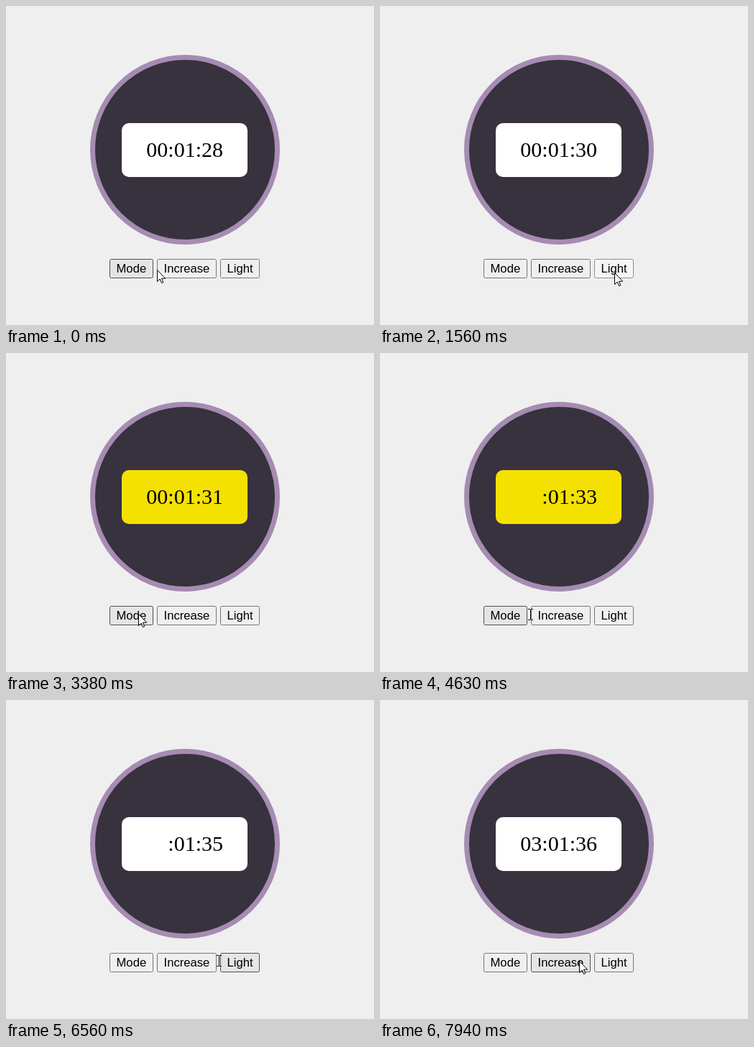
An HTML page that plays this animation: 512x444 px, repeating every 8000 ms.

```html
<!DOCTYPE html>
<html lang="en">
<head>
<meta charset="utf-8">
<title>Watch</title>
<style>
  html, body { margin: 0; width: 100%; height: 100%; overflow: hidden; background: #efefef; }
  svg { display: block; width: 512px; height: 444px; }
  .time { font: 30px "Liberation Serif", "Times New Roman", serif; }
  .button text { font: 16.667px "Liberation Sans", Arial, sans-serif; }
  .button rect { fill: #efefef; stroke: #767676; }
  .button.hover rect { fill: #e5e5e5; stroke: #4f4f4f; }
  .button.active rect { fill: #f5f5f5; stroke: #8d8d8d; }
</style>
</head>
<body>
<svg viewBox="0 0 512 444">
  <circle cx="249" cy="200" r="128.5" fill="#37323e" stroke="#a68bb2" stroke-width="7"/>
  <rect id="panel" x="161" y="163" width="175" height="75" rx="10"/>
  <text class="time" id="hours" x="195.3" y="210"></text>
  <text class="time" id="rest" x="225.3" y="210"></text>
  <g id="buttons"></g>
  <path id="arrow" d="M.5.5V16.5L4.2 13 6.6 18.6 8.8 17.6 6.4 12.2H11.6Z" fill="#fff" stroke="#000"/>
  <path id="beam" d="M-3-7.5H0M1-7.5H4M.5-7V7M-3 7.5H0M1 7.5H4" fill="none" stroke="#000"/>
</svg>
<script>
const LOOP = 8000, STEP = 62.5;
const $ = id => document.getElementById(id);
const pad = n => String(n).padStart(2, "0");

const buttons = [["Mode", 144, 61], ["Increase", 210, 83], ["Light", 298, 55]].map(([label, x, width]) => {
  $("buttons").insertAdjacentHTML("beforeend",
    `<g class="button"><rect x="${x + .5}" y="352.5" width="${width - 1}" height="26" rx="2"/>
     <text x="${x + 9.5}" y="371">${label}</text></g>`);
  return { label, x, end: x + width, node: $("buttons").lastElementChild };
});

// Pointer route: time, x, y
const route = [
  [-STEP, 205, 367], [0, 210.6, 367], [650, 318, 373], [1000, 326, 371],
  [2900, 326, 371], [3375, 184, 363], [3600, 180, 366], [4400, 180, 366],
  [4625, 209.8, 364], [5250, 357, 365], [5600, 343, 367], [6300, 343, 367],
  [6562.5, 296.6, 363], [6750, 277, 363], [LOOP, 277, 363]
];

// Button, pressed at, released at
const presses = [
  ["Light", 1530, 1680], ["Mode", 3700, 3800], ["Light", 6000, 6110],
  ["Increase", 6900, 6990], ["Increase", 7180, 7270], ["Increase", 7480, 7570]
];

function pointer(t) {
  const i = route.findIndex(k => k[0] > t);
  const [t0, x0, y0] = route[i - 1], [t1, x1, y1] = route[i];
  const p = (t - t0) / (t1 - t0);
  return { x: x0 + (x1 - x0) * p, y: y0 + (y1 - y0) * p };
}

const buttonAt = x => buttons.find(b => x >= b.x && x <= b.end);
const clicks = (label, t) => presses.filter(p => p[0] === label && t >= p[2]).length;

function draw(t) {
  const { x, y } = pointer(t);
  const hovered = buttonAt(pointer(t - STEP).x);   // hover trails the pointer
  const pressed = presses.find(p => t >= p[1] && t < p[2]);
  for (const b of buttons) {
    const state = pressed && pressed[0] === b.label ? " active" : b === hovered ? " hover" : "";
    b.node.setAttribute("class", "button" + state);
  }

  $("panel").setAttribute("fill", clicks("Light", t) % 2 ? "#f5e100" : "#fff");
  const blank = clicks("Mode", t) && t % 1000 >= 350 && t % 1000 < 850;
  $("hours").textContent = blank ? "" : pad(clicks("Increase", t));
  $("rest").textContent = ":01:" + pad(28 + Math.floor((t + 530) / 1000));

  const gap = x > 205 && x < 298 && !buttonAt(x);
  const place = `translate(${Math.floor(x)} ${Math.round(y)})`;
  $("arrow").setAttribute("transform", place);
  $("beam").setAttribute("transform", place);
  $("arrow").style.display = gap ? "none" : "";
  $("beam").style.display = gap ? "" : "none";
}

const start = performance.now();
function tick() {
  const t = (performance.now() - start) % LOOP;
  draw(Math.min(Math.floor((t + 3) / STEP) * STEP, LOOP - STEP));
  requestAnimationFrame(tick);
}
tick();
</script>
</body>
</html>
```
